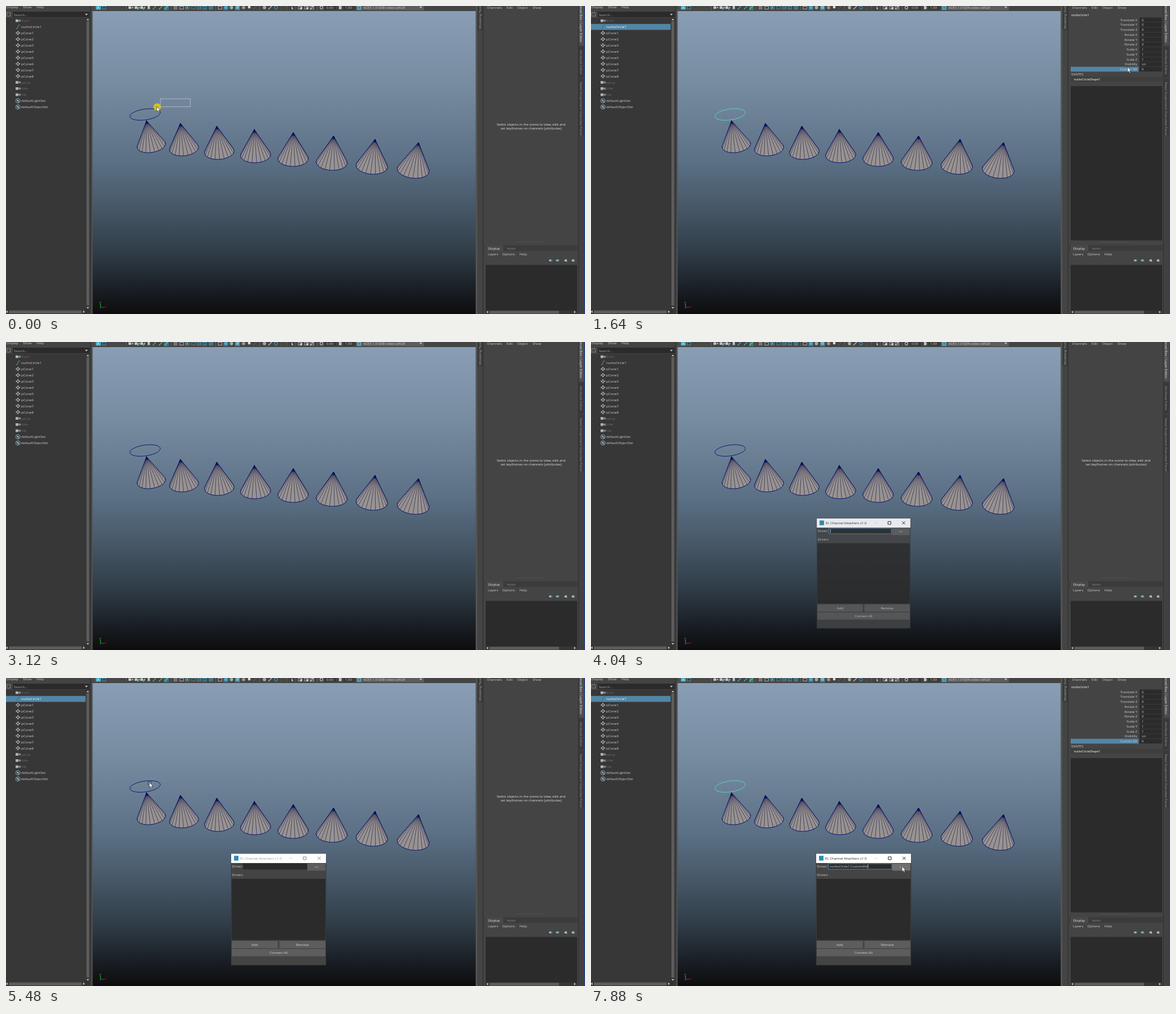
These frames come from a looping animation (1026 by 546 pixels, 8 s). An HTML page:

```html
<!DOCTYPE html>
<html lang="en">
<head>
<meta charset="utf-8">
<title>Connect attribute</title>
<style>
html, body { margin: 0; width: 100%; height: 100%; overflow: hidden; background: #444; }
svg { display: block; width: 1026px; height: 546px; }
text { font: 6.1px "Open Sans", "Noto Sans", sans-serif; fill: #cfcfcf; white-space: pre; }
</style>
</head>
<body>
<svg id="stage" viewBox="0 0 1026 546" xmlns="http://www.w3.org/2000/svg"></svg>
<script>
const LOOP = 8000;
const stage = document.getElementById('stage');
const NAVY = '#03076b', BLUE = '#5285a6', DARK = '#2b2b2b', BTN = '#5d5d5d';

// Markup helpers
const rect = (x, y, w, h, fill, more = '') =>
  `<rect x="${x}" y="${y}" width="${w}" height="${h}" fill="${fill}" ${more}/>`;
const path = (d, fill, more = '') => `<path d="${d}" fill="${fill}" ${more}/>`;
const line = (d, color, w = 1, more = '') => path(d, 'none', `stroke="${color}" stroke-width="${w}" ${more}`);
const circle = (x, y, r, fill, more = '') => `<circle cx="${x}" cy="${y}" r="${r}" fill="${fill}" ${more}/>`;
// y is the vertical middle of the line
const text = (x, y, s, fill = '#cfcfcf', more = '') =>
  `<text x="${x}" y="${y + 2.2}" style="fill:${fill}" ${more}>${s}</text>`;
const group = (id, body, more = '') => `<g id="${id}" ${more}>${body}</g>`;
const arrow = (x, y, dir, fill = '#c4c4c4') => {
  const d = { up: 'm-2.5,1.3h5l-2.5,-3z', down: 'm-2.5,-1.3h5l-2.5,3z',
              left: 'm1.3,-2.5v5l-3,-2.5z', right: 'm-1.3,-2.5v5l3,-2.5z' }[dir];
  return path(`M${x},${y}${d}`, fill);
};

// Outliner
const rowY = i => 26 + 10.93 * i;
const names = ['front', 'nurbsCircle1', ...Array.from({ length: 8 }, (_, i) => 'pCone' + (i + 1)),
  'persp', 'side', 'top', 'defaultLightSet', 'defaultObjectSet'];

function rowIcon(i, y) {
  if (i === 1) return line(`M18,${y + 3}q2,2 3,-3t4,-3`, '#5b9cc4', 1, 'id="curveIcon"');
  if (i < 1 || (i > 9 && i < 13))
    return rect(17, y - 2.2, 5.2, 4.6, '#b2b2b2') + path(`M22.5,${y}l3,-2.2v4.6z`, '#b2b2b2');
  if (i < 10)
    return [[21.2, -2.2], [18.7, 0], [23.7, 0], [21.2, 2.2]].map(([x, dy]) =>
      path(`M${x - 2},${y + dy}l2,-1.6l2,1.6l-2,1.6z`, '#b3bcc1', 'stroke="#3a3a3a" stroke-width=".4"')).join('');
  return circle(21.2, y, 3.9, '#333b3e', 'stroke="#b5bcbf" stroke-width=".8"') +
    circle(22, y + .7, 1.6, '#58b5c6') + circle(20.4, y - .8, 1.1, '#d3dadc');
}

function outliner() {
  const dim = i => i < 1 || (i > 9 && i < 13);
  return rect(0, 0, 150, 546, '#444') +
    text(1, 1.3, 'Display') + text(30, 1.3, 'Show') + text(54, 1.3, 'Help') +
    rect(1.5, 11.5, 6, 6.5, 'none', 'stroke="#bbb" stroke-width=".9" stroke-dasharray="2 1.6"') +
    rect(12, 10, 136, 10, DARK) + text(14, 15.3, 'Search...', '#a6a6a6') + arrow(142.5, 15, 'down') +
    rect(0, 21, 142, 517, '#373737') +
    rect(0, rowY(1) - 5.2, 141, 10.6, BLUE, 'id="rowSel"') +
    names.map((n, i) => rowIcon(i, rowY(i)) + text(27, rowY(i), n, dim(i) ? '#6e6e6e' : '#cfcfcf',
      i === 1 ? 'id="rowName"' : '')).join('') +
    rect(142, 21, 6, 517, '#313131') + rect(142.5, 27, 5, 504, '#5d5d5d') +
    arrow(145, 24, 'up') + arrow(145, 535, 'down') +
    rect(0, 538, 148, 8, '#333') + rect(5, 539.5, 129, 5.5, '#5d5d5d') +
    arrow(1.5, 542, 'left') + arrow(138, 542, 'right') +
    rect(148, 0, 3, 546, '#3b3b3b') + rect(150.5, 0, 1, 546, '#2e2e2e') + rect(151.5, 0, 2, 546, '#565656');
}

// Viewport
function toolbar() {
  const light = '#bcc2c5', cyan = '#4fa9c2', dim = '#585858';
  const box = (x, c) => rect(x - 3, .5, 6.5, 5, 'none', `stroke="${c}" stroke-width=".8"`);
  const ball = (x, c) => circle(x, 2.8, 3, c);
  const cam = x => rect(x - 4, .5, 5, 4.5, light) + path(`M${x + 1.5},2.7l3,-2v4z`, light);
  const slash = (x, c) => line(`M${x - 3},6l6,-6`, c, 1.3);
  const gap = x => line(`M${x},0v7`, '#858585', .9, 'stroke-dasharray="1.5 1"');
  return rect(153, 0, 680, 9, '#444') +
    rect(159, 0, 9, 6.5, cyan) + text(161.6, 2.6, 'A', '#fff') + box(173.5, cyan) +
    [185, 196, 205].map(x => box(x, dim)).join('') +
    cam(221) + cam(232) + cam(242) + circle(234, 5, 1.6, cyan) + circle(244, 5, 1.6, cyan) +
    path('M251,0h4v6.5l-2,-2l-2,2z', light) + slash(263, cyan) + slash(274, '#59b98f') +
    rect(280, 0, 8.5, 7.5, '#3d7186') + slash(284, '#5fd08a') +
    rect(297, 0, 6.5, 6, '#8d9497') + line('M297,2h6.5M297,4h6.5M299,0v6M301.5,0v6', '#444', .5) +
    box(311, light) + box(321, cyan) + box(332, '#6f8f9b') + box(342, cyan) + box(352, cyan) + box(363, cyan) +
    circle(321, 3, 1.3, light) + line('M340,3h6M352,0v6M361,3h6M363,0v6', cyan, .8) +
    box(379, light) + rect(385, 0, 9.5, 7.5, '#3f6b80') + ball(389.6, cyan) + ball(399.5, '#a0a9ad') +
    rect(406, 0, 8.5, 7.5, '#4f7f93') + rect(407.5, 0, 5.5, 5, '#7db0bf') + ball(421, '#8f9597') +
    circle(431, 2, 2.4, '#dedbc8') + slash(441, dim) +
    ball(458, '#a0a7aa') + slash(468, light) + circle(478.5, 2.8, 2.7, 'none', `stroke="${cyan}" stroke-width="1"`) +
    box(489, dim) + path('M506,0l3,5l-3,1z', light) + box(521, light) + rect(521, 2, 4, 4, light) +
    box(532, light) + rect(532, 2, 4, 4, light) + box(542, light) + slash(542, light) +
    circle(559, 2.8, 2.5, 'none', `stroke="${light}" stroke-width="1.2"`) +
    rect(565, 0, 20, 7, '#393939') + text(568, 2.6, '0.00') +
    path('M590,0h2a2.8,2.8 0 0 1 0,5.8h-2z', light) + rect(598, 0, 20, 7, '#393939') + text(601, 2.6, '1.00') +
    rect(621, 0, 9.5, 7.5, '#4b8295') + circle(626, 3, 3, 'none', 'stroke="#86c4d4" stroke-width=".8"') +
    rect(631.5, -1, 109, 8.5, BTN) + text(633.5, 2.9, 'ACES 1.0 SDR-video (sRGB') + arrow(735, 2.6, 'down') +
    [156.5, 213, 292.5, 371.5, 449.5, 497.5, 513, 551.5].map(gap).join('');
}

// Each cone: apex x, apex y, base centre x, base centre y
const cones = [
  [249, 203.5, 257.5, 246.8], [309, 208, 315.5, 252.4], [373.5, 213, 378, 258.5], [440, 218.8, 442.3, 264.3],
  [509, 224.3, 508.8, 270.5], [580.5, 230.3, 577.2, 277.2], [654, 236.3, 648.2, 283.8], [731, 242, 721.6, 290.6]
];
const ROW_SLOPE = .095;

function cone([ax, ay, cx, cy], i) {
  const tilt = (-9 + i * 2.2) * Math.PI / 180, rx = 25.7 + i * .4, ry = 12.9 + i * .25, n = 20;
  // The first edge points along the row
  const turn = Math.atan2((ROW_SLOPE - Math.tan(tilt)) * rx, ry);
  const pt = k => {
    const a = turn + k / n * Math.PI * 2, u = rx * Math.cos(a), v = ry * Math.sin(a);
    return [cx + u * Math.cos(tilt) - v * Math.sin(tilt), cy + u * Math.sin(tilt) + v * Math.cos(tilt)];
  };
  const front = k => {
    const [x, y] = pt(k), [p, q] = pt(k + 1);
    return (p - ax) * (y - ay) - (q - ay) * (x - ax) <= 0;
  };
  let faces = '', base = '', spokes = '', rim = '';
  for (let k = 0; k < n; k++) {
    const a = front(k), b = front(k - 1), here = pt(k), next = pt(k + 1);
    if (a) {
      faces += `M${ax},${ay}L${here}L${next}z`;
      base += `M${here}L${next}`;
    }
    if (a && b) spokes += `M${ax},${ay}L${here}`;
    else if (a || b) rim += `M${ax},${ay}L${here}`;
  }
  return path(faces, '#989391') + line(spokes, '#14143f', .6) + line(base + rim, NAVY, .9) +
    path(`M${ax},${ay - .5}l-2.2,6h4.8z`, NAVY, 'opacity=".75"');
}

function viewport() {
  const stops = [[0, '#899eb5'], [.26, '#768a9f'], [.49, '#5c7186'], [.64, '#48596a'], [.78, '#33404c'],
    [.92, '#191e24'], [1, '#0d0d0d']];
  return `<linearGradient id="sky" x1="0" y1="0" x2="0" y2="1">` +
    stops.map(([o, c]) => `<stop offset="${o}" stop-color="${c}"/>`).join('') + `</linearGradient>` +
    rect(153.5, 9, 679, 537, 'url(#sky)') + toolbar() +
    `<ellipse id="curve" cx="246.5" cy="192.3" rx="27.2" ry="9.6" fill="none" stroke-width=".8" transform="rotate(-8 246.5 192.3)"/>` +
    cones.map(cone).join('') +
    line('M167.5,534v-6', '#19d219', 1) + line('M167.5,534.3h6.5', '#e01414', 1.1) + line('M167.5,534l-1.5,3', '#1c2ee0', 1.2) +
    text(165.5, 524.5, 'y', '#19d219', 'font-weight="700"') + text(174.3, 532.5, 'x', '#e01414', 'font-weight="700"');
}

// Right side
const attrs = ['Translate X', 'Translate Y', 'Translate Z', 'Rotate X', 'Rotate Y', 'Rotate Z',
  'Scale X', 'Scale Y', 'Scale Z', 'Visibility', 'Custom Att'];
const attrY = i => 24.5 + 8.75 * i;
const small = 'style="font-size:5.9px;fill:#cfcfcf"';

function channels() {
  const value = i => i > 5 && i < 9 ? '1' : i === 9 ? 'on' : '0';
  const bold = 'style="font-size:5.2px;font-weight:600;fill:#d6d6d6"';
  return `<text x="851" y="18" ${bold}>nurbsCircle1</text>` +
    rect(850, attrY(10) - 4.3, 120, 8.6, BLUE, 'id="attrSel"') +
    attrs.map((a, i) => `<text x="968" y="${attrY(i) + 2.1}" text-anchor="end" ${small}>${a}</text>` +
      rect(972, attrY(i) - 4.1, 39.5, 8.1, DARK) +
      `<text x="976" y="${attrY(i) + 2.1}" ${small}>${value(i)}</text>`).join('') +
    `<text x="851" y="123.2" ${small}>SHAPES</text>` +
    rect(850, 125.6, 162, 8.6, '#3e3e3e') + `<text x="855.5" y="131.8" ${bold}>nurbsCircleShape1</text>` +
    rect(850, 142, 162, 273.5, DARK);
}

function side() {
  const tab = (y, s, fill, more = '') =>
    `<text transform="translate(1017.3 ${y}) rotate(90)" style="fill:${fill}" ${more}>${s}</text>`;
  const arrowIcon = x => path(`M${x - 3.5},451l3.5,-2.2v4.4z`, '#c3ccd0') + rect(x + .4, 449.4, 2, 3.2, '#58a9c1');
  const layerIcon = x => path(`M${x - 3.2},451.2l3.2,-2.4l2.6,1.6l-3.2,2.6z`, '#bcc5c9') + circle(x + 1.2, 452.4, 1.2, '#4bb3d1');
  return rect(832.5, 0, 2.5, 546, '#565656') + rect(835, 0, 10, 546, '#444') +
    rect(835, 0, 10, 43, '#3a3a3a') +
    `<text transform="translate(841.8 40.5) rotate(-90)" style="fill:#a5a5a5">Modeling Toolkit</text>` +
    rect(844.5, 0, 2, 546, '#353535') + rect(846.5, 0, 167, 546, '#444') +
    text(852.5, 3.2, 'Channels') + text(887, 3.2, 'Edit') + text(906, 3.2, 'Object') + text(933, 3.2, 'Show') +
    group('hint', text(930.5, 210, 'Select objects in the scene to view, edit and', '#e2e2e2', 'text-anchor="middle"') +
      text(930.5, 217, 'set keyframes on channels (attributes)', '#e2e2e2', 'text-anchor="middle"')) +
    group('channels', channels()) +
    line('M902,418.7h54', '#555', .8) +
    rect(848, 424, 165, 10, '#3b3b3b') + rect(850, 424.5, 31, 10, '#4a4a4a') +
    text(854.5, 429.8, 'Display', '#e6e6e6') + text(888, 429.8, 'Anim', '#8c8c8c') +
    text(854, 439.6, 'Layers') + text(879.5, 439.6, 'Options') + text(910, 439.6, 'Help') +
    arrowIcon(965) + arrowIcon(977.5) + layerIcon(992) + layerIcon(1005) +
    rect(850, 459, 162, 81, DARK) + rect(850, 539.5, 162, 6.5, '#353535') + rect(857, 540.2, 123, 5.2, '#5d5d5d') +
    arrow(853, 542.5, 'left') + arrow(1008, 542.5, 'right') +
    rect(1013.5, 0, 2, 546, '#353535') + rect(1015, 0, 9.5, 546, '#414141') +
    rect(1015, 0, 9.5, 70, '#4d4d4d') + rect(1015, 72, 9.5, 55, '#393939') + rect(1015, 129, 9.5, 101, '#393939') +
    tab(65, 'Channel Box / Layer Editor', '#eee', 'text-anchor="end"') +
    tab(78, 'Attribute Editor', '#979797') + tab(135, 'Reed Assignment Overview Panel', '#979797') +
    rect(1024.3, 0, 1.7, 546, '#1f4684');
}

// Tool window
function dialog() {
  const button = (x, y, w, h, s, id = '') => rect(x, y, w, h, BTN, id && `id="${id}"`) +
    text(x + w / 2, y + h / 2, s, '#d6d6d6', 'text-anchor="middle"');
  return rect(399, 311.5, 168, 197.5, '#444', 'stroke="#2d3338" stroke-width=".6"') +
    rect(399, 311.5, 168, 16.5, '#fff') + rect(404, 315.2, 8, 8.4, '#2d8fb0') +
    text(415, 319.8, 'EL Channel Attachers v1.0', '#222', 'id="title"') +
    line('M502,319.8h6', '#ccc', .8) +
    group('winKeys', '<path d="M526.8,317h5.2v5h-5.2zM552.3,316.9l5.2,5.2m0,-5.2l-5.2,5.2" fill="none"/>') +
    text(400.3, 334, 'Driver:') + rect(420.5, 329.2, 112.5, 9.8, DARK, 'id="field" stroke-width="1"') +
    text(422.8, 333.8, 'nurbsCircle1.CustomAtt', '#d6d6d6', 'id="driver"') +
    rect(0, 330.5, .8, 7, '#e8e8e8', 'id="caret"') +
    button(534, 329, 32, 12.5, '&lt;&lt;', 'pick') +
    text(400.3, 348.8, 'Driven:') + rect(400, 356, 166, 108.5, DARK) +
    button(400, 466, 81.5, 13, 'Add') + button(484.5, 466, 81.5, 13, 'Remove') + button(400, 480.3, 166, 13, 'Connect All');
}

stage.innerHTML = outliner() + viewport() + side() + group('win', dialog()) +
  rect(0, 0, 1, 1, 'none', 'id="band" stroke-width=".9" stroke-dasharray="1 1"') +
  group('mouse', circle(1, 1, 6.6, '#d9cc16', 'id="press" opacity=".88"') +
    path('M0,0v9.4l2.2,-2l1.7,3.6l1.6,-.8l-1.7,-3.4h3z', '#fff', 'stroke="#20242a" stroke-width=".7"'));

const el = {};
stage.querySelectorAll('[id]').forEach(e => el[e.id] = e);
const show = (e, on) => e.style.display = on ? '' : 'none';
const set = (e, o) => { for (const k in o) e.setAttribute(k, o[k]); };

// Pointer way: time, x, y
const way = [
  [80, 267, 178], [520, 233, 197], [880, 230, 200], [1200, 951, 111], [1400, 951, 111], [1480, 950.5, 108],
  [1720, 950.5, 108], [1900, 968, 113], [2200, 822, 116], [2560, 690, 150], [2720, 690, 150], [3000, 706, 166],
  [4400, 470, -14], [5280, 251, 183], [5440, 254, 185], [5640, 254, 185], [6040, 988, 91], [6240, 951, 112],
  [6520, 951, 112], [7020, 562, 377], [7280, 551, 334]
];
const presses = [[0, 520], [1400, 1560], [2580, 2700], [5280, 5440], [6260, 6380], [7360, 7440]];
const within = (t, a, b) => t >= a && t < b;

function pointer(t) {
  const i = way.findIndex(p => p[0] > t);
  if (i === 0) return way[0].slice(1);
  if (i < 0) return way[way.length - 1].slice(1);
  const [a, x, y] = way[i - 1], [b, p, q] = way[i];
  const u = (t - a) / (b - a), e = u * u * (3 - 2 * u);
  return [x + (p - x) * e, y + (q - y) * e];
}

function draw(t) {
  const [x, y] = pointer(t);
  show(el.mouse, !within(t, 3120, 4400));
  set(el.mouse, { transform: `translate(${x} ${y})` });
  show(el.press, presses.some(([a, b]) => within(t, a, b)));

  const drag = t < 520, tap = within(t, 5360, 5520);
  show(el.band, drag || tap);
  if (drag) {
    const lag = t < 80 ? 6.5 : 1, bx = x + lag, by = Math.max(y, 178.5);
    set(el.band, { x: bx, y: 164.5, width: 326.5 - bx, height: by - 164.5, stroke: '#eef2f5' });
  } else if (tap) set(el.band, { x: 251.5, y: 183.5, width: 6, height: 5.5, stroke: '#1b2430' });

  const row = within(t, 560, 2680) || t >= 5440;
  const picked = within(t, 600, 2680) || t >= 5520;
  show(el.rowSel, row);
  el.rowName.style.fill = row ? '#fff' : '#cfcfcf';
  set(el.curveIcon, { stroke: row ? '#3d6a88' : '#5b9cc4' });
  set(el.curve, { stroke: picked ? '#48ecb8' : NAVY });
  show(el.channels, picked);
  show(el.hint, !picked);
  show(el.attrSel, within(t, 1440, 2680) || t >= 6300);

  show(el.win, t >= 3920);
  const o = Math.min(1, Math.max(0, (t - 3920) / 240)), e = 1 - (1 - o) ** 2.9;
  const s = .9 + .1 * e;
  set(el.win, { transform: `translate(483 410.3) scale(${s}) translate(-483 -410.3)`, opacity: e });
  const filled = t >= 7760, active = t < 5360 || filled;
  el.title.style.fill = active ? '#222' : '#999';
  set(el.winKeys, { stroke: active ? '#222' : '#888' });
  set(el.field, { stroke: active ? BLUE : DARK });
  show(el.driver, filled);
  show(el.caret, active && (filled || (t - 3920) % 1060 < 530));
  set(el.caret, { x: filled ? 423.2 + el.driver.getComputedTextLength() : 423 });
  set(el.pick, { fill: within(t, 7360, 7440) ? DARK : t >= 7200 ? '#707070' : BTN });
}

const start = performance.now();
function tick() {
  draw((performance.now() - start) % LOOP);
  requestAnimationFrame(tick);
}
tick();
</script>
</body>
</html>
```
